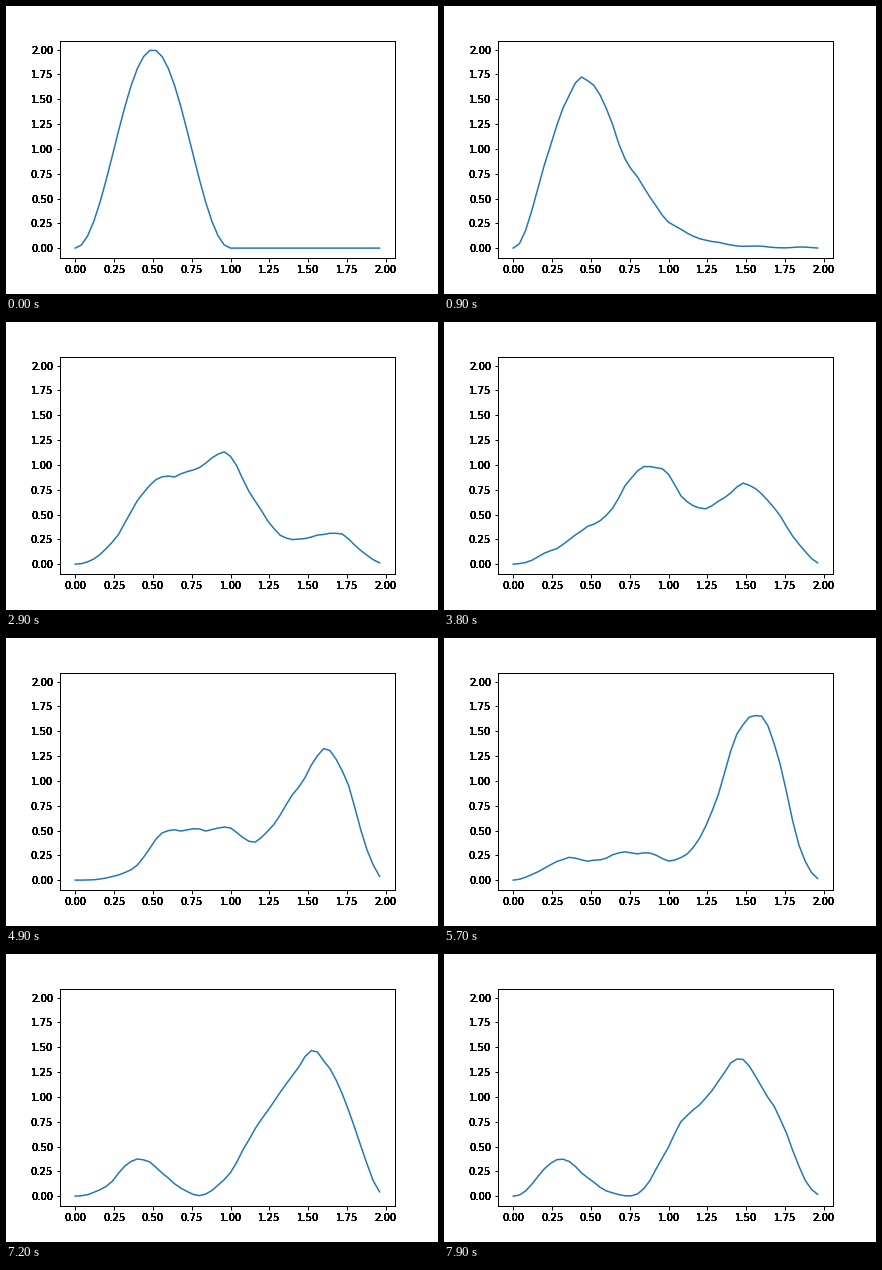
Recreate the animation shown at these times as a matplotlib script. Size 432 by 288 pixels, loop 8 s.

```python
import numpy as np
import matplotlib.pyplot as plt
from matplotlib.animation import FuncAnimation

# Ground state of a unit box released into a box of width 2 (hbar = m = 1)
FRAMES, DT, MODES = 80, 0.01, 100
PAD = 7          # tick length + label padding, in points
LABEL_COATS = 9  # repeated drawing hardens the label edges

x = np.arange(50) * 0.04
n = np.arange(1, MODES + 1)
coef = (np.sinc(1 - n / 2) - np.sinc(1 + n / 2)) / np.sqrt(2)
energy = (n * np.pi) ** 2 / 8
modes = np.sin(np.outer(x, n) * np.pi / 2)


def density(t):
    return np.abs(modes @ (coef * np.exp(-1j * energy * t))) ** 2


plt.rcParams.update({"font.family": "DejaVu Sans", "font.size": 10})
fig = plt.figure(figsize=(6, 4), dpi=72, facecolor="white")
ax = fig.add_axes([0.125, 0.125, 0.775, 0.755])
line, = ax.plot(x, density(0), color="#1f77b4", lw=1.5)
ax.set_xlim(ax.get_xlim())
ax.set_ylim(ax.get_ylim())

ticks = np.linspace(0, 2, 9)
ax.set_xticks(ticks)
ax.set_yticks(ticks)
ax.tick_params(length=3.5, width=1, labelbottom=False, labelleft=False)
for spine in ax.spines.values():
    spine.set_linewidth(1)


def label(px, py, value, placement):
    trans, va, ha = placement
    for _ in range(LABEL_COATS):
        ax.text(px, py, f"{value:.2f}", transform=trans, va=va, ha=ha)


for v in ticks:
    label(v, 0, v, ax.get_xaxis_text1_transform(PAD))
    label(0, v, v, ax.get_yaxis_text1_transform(PAD))


def update(i):
    line.set_ydata(density(i * DT))
    return line,


anim = FuncAnimation(fig, update, frames=FRAMES, interval=100,
                     repeat=True, repeat_delay=0, blit=False)
plt.show()
```
